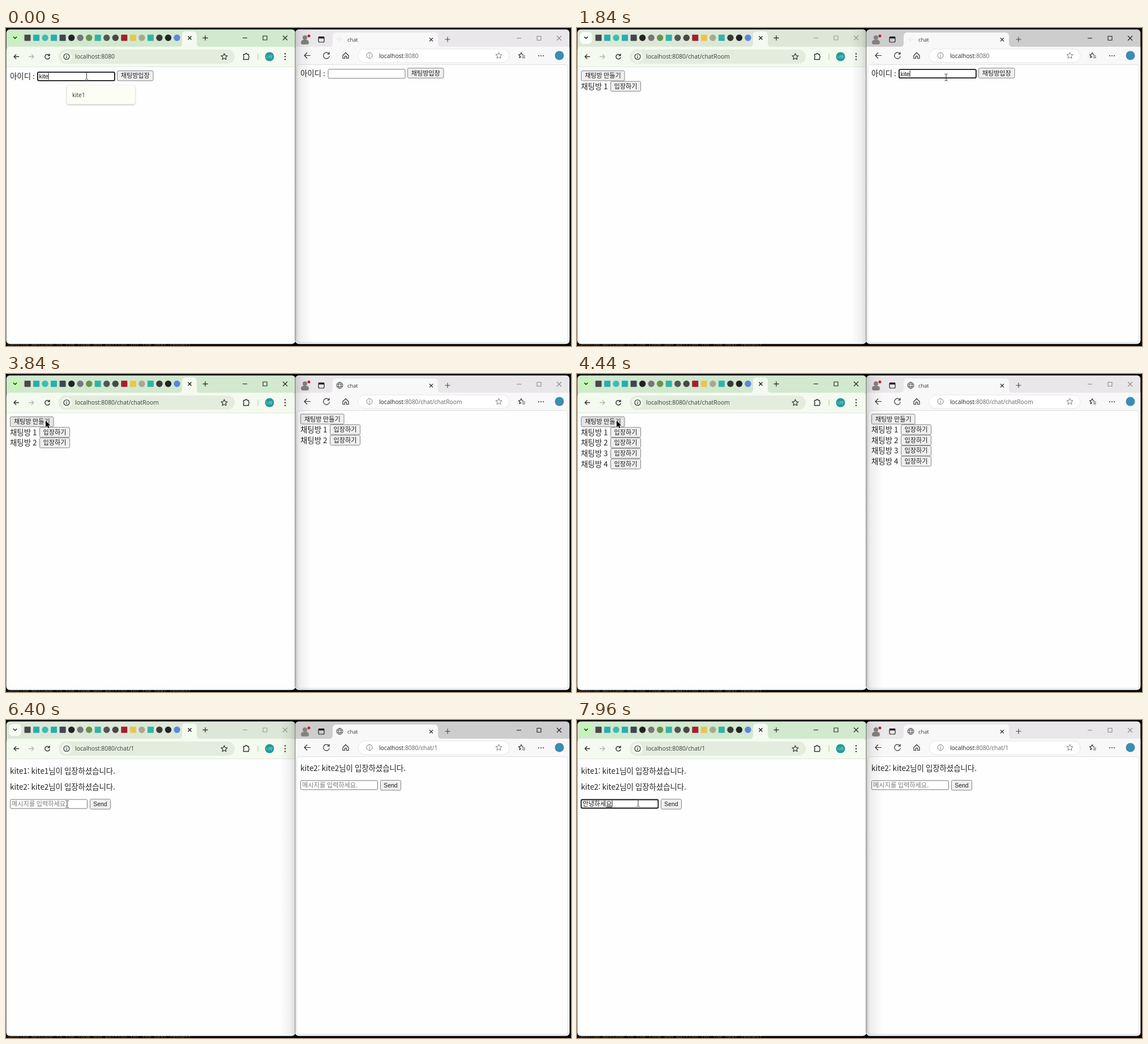
Animation of 998x561 px, one loop 8000 ms. Source, as an HTML page with a canvas:

```html
<!DOCTYPE html>
<html lang="ko">
<head>
<meta charset="utf-8">
<title>chat</title>
<style>
html, body { margin: 0; width: 100%; height: 100%; overflow: hidden; background: #000; }
canvas { display: block; width: 100vw; height: 100vh; }
</style>
</head>
<body>
<canvas id="stage" width="998" height="561"></canvas>
<script>
const c = document.getElementById('stage').getContext('2d');
const LOOP = 8000;
const KR = '"Noto Sans CJK KR", "Noto Sans CJK JP", "Noto Sans CJK", sans-serif';
const UI = '"Open Sans", sans-serif';
const ARIAL = '"Liberation Sans", "Noto Sans CJK KR", sans-serif';
const TYPED = 'ㅇ,아,안,안ㄴ,안녀,안녕,안녕ㅎ,안녕하,안녕핫,안녕하세,안녕하셍,안녕하세요'.split(',');
const JOINED = n => `kite${n}: kite${n}님이 입장하셨습니다.`;

// Pointer path: time, x, y
const PATH = [
  [0, 142.5, 84.5], [280, 142.5, 84.5], [600, 228, 84], [850, 228, 84], [1200, 652, 87], [2000, 652, 87],
  [2250, 741, 81], [2430, 741, 81], [2580, 757, 187], [2700, 757, 187], [3180, 70, 82], [4440, 70, 82],
  [4800, 90, 98], [5200, 90, 98], [5500, 617, 99], [5950, 617, 99], [6350, 108, 148.5], [6650, 108, 146.5], [LOOP, 108, 146.5]
];
const FAVICONS = [
  ['#484848', 1], ['#28aeb0', 1], ['#3abdb5', 0], ['#28aeb0', 1], ['#3c4654', 1], ['#222', 0],
  ['#777', 0], ['#6a934f', 0], ['#2fb5a5', 1], ['#555', 0], ['#484848', 0], ['#a3202c', 1],
  ['#e6c650', 1], ['#a8a890', 0], ['#2fb5a5', 1], ['#3a3a3a', 0], ['#222', 0], ['#5b86dc', 0]
];

let pointer, overInput;
let origin = { x: 0, y: 0 };

function pointerAt(t) {
  const i = Math.max(1, PATH.findIndex(p => p[0] >= t));
  const [t0, x0, y0] = PATH[i - 1], [t1, x1, y1] = PATH[i];
  const u = (t - t0) / (t1 - t0), e = u * u * (3 - 2 * u);
  return { x: x0 + (x1 - x0) * e, y: y0 + (y1 - y0) * e };
}

function text(s, x, y, size, color = '#222', font = KR) {
  c.font = size + 'px ' + font;
  c.fillStyle = color;
  c.fillText(s, x, y);
  return c.measureText(s).width;
}

function box(x, y, w, h, r, fill, stroke, width = 1) {
  c.beginPath();
  c.roundRect(x, y, w, h, r);
  if (fill) { c.fillStyle = fill; c.fill(); }
  if (stroke) { c.strokeStyle = stroke; c.lineWidth = width; c.stroke(); }
}

function disc(x, y, r, fill) {
  c.beginPath();
  c.arc(x, y, r, 0, 7);
  c.fillStyle = fill;
  c.fill();
}

// Strokes SVG path data centred on (x, y)
function icon(d, x, y, color = '#333', width = 1.2) {
  c.save();
  c.translate(x, y);
  c.strokeStyle = color;
  c.lineWidth = width;
  c.lineJoin = 'round';
  c.stroke(new Path2D(d));
  c.restore();
}

const ICON = {
  back: 'M5 0H-4M0 -4L-4 0L0 4',
  forward: 'M-5 0H4M0 -4L4 0L0 4',
  reload: 'M3.4 -2.4A4.2 4.2 0 1 0 4.2 1M4 -5V-1.8H.8',
  info: 'M-5 0A5 5 0 1 0 5 0A5 5 0 1 0 -5 0M0 -.8V3M0 -3V-1.8',
  star: 'M0 -5.5L1.6 -1.9L5.5 -1.5L2.6 1.1L3.4 5L0 3L-3.4 5L-2.6 1.1L-5.5 -1.5L-1.6 -1.9Z',
  puzzle: 'M-5 -3.5H-2A1.7 1.7 0 0 1 1.4 -3.5H4V-.5A1.7 1.7 0 0 1 4 2.5V5.5H-5V2.5A1.7 1.7 0 0 0 -5 -.5Z',
  home: 'M-5 0L0 -5L5 0V5H1.5V1H-1.5V5H-5Z',
  list: 'M-1 2L-4 4L-3.2 .8L-5.6 -1.4L-2.6 -1.8L-1 -5L.6 -1.8L3 -1.5M1 1H6M1 4H6',
  globe: 'M-5.5 0A5.5 5.5 0 1 0 5.5 0A5.5 5.5 0 1 0 -5.5 0M-5 -2H5M-5 2H5M0 -5.5C-3.4 -2 -3.4 2 0 5.5C3.4 2 3.4 -2 0 -5.5',
  plus: 'M-4.5 0H4.5M0 -4.5V4.5',
  close: 'M-4 -4L4 4M4 -4L-4 4',
  cross: 'M-3 -3L3 3M3 -3L-3 3',
  min: 'M-4 0H4',
  max: 'M-3.5 -3.5H3.5V3.5H-3.5Z',
  chevron: 'M-3 -1.5L0 1.5L3 -1.5'
};

function windowButtons(x, y, color) {
  ['min', 'max', 'close'].forEach((name, i) => icon(ICON[name], x + i * 35.5, y, color, 1.1));
}

// Active tab with corners flaring into the toolbar below
function tab(x0, x1, top, bottom, fill) {
  const r = 6;
  c.beginPath();
  c.moveTo(x0 - r, bottom);
  c.arcTo(x0, bottom, x0, bottom - r, r);
  c.arcTo(x0, top, x0 + r, top, r);
  c.arcTo(x1, top, x1, top + r, r);
  c.arcTo(x1, bottom, x1 + r, bottom, r);
  c.lineTo(x1 + r, bottom);
  c.fillStyle = fill;
  c.fill();
}

function pointerInside(x, y, w, h) {
  const px = pointer.x - origin.x, py = pointer.y - origin.y;
  return px > x && px < x + w && py > y && py < y + h;
}

function button(label, x, y, w, font = KR, size = 11.1) {
  const fill = pointerInside(x, y, w, 18) ? '#e5e5e5' : '#efefef';
  box(x + .5, y + .5, w - 1, 17.5, 2, fill, '#858585');
  c.textAlign = 'center';
  text(label, x + w / 2, y + 13.2, size, '#1c1c1c', font);
  c.textAlign = 'left';
}

function input(x, y, { value = '', focus, hint, composing }) {
  if (pointerInside(x, y - 2, 137, 21)) overInput = true;
  if (focus) box(x + .4, y + .8, 136, 15, 2, '#fff', '#151515', 1.8);
  else box(x + .5, y + .5, 136, 16, 2, '#fff', '#777');
  if (!value && hint) text(hint, x + 3, y + 12.4, 11.2, '#7a7a7a');
  const font = composing ? KR : ARIAL, size = composing ? 11.2 : 10.3;
  const w = value ? text(value, x + 3, y + 12.2, size, '#151515', font) : 0;
  c.fillStyle = '#151515';
  if (focus) c.fillRect(x + 3 + w, y + 2.5, 1, 11.5);
  if (composing && value) c.fillRect(x + 3 + w - 10, y + 13.3, 10, 1);
}

// Pages share one layout; the origin places them in a window
function loginPage(state) {
  text('아이디 :', 7, 89.5, 13.4);
  input(55.5, 77, state);
  button('채팅방입장', 196, 75, 64.5);
}

function roomsPage(count) {
  button('채팅방 만들기', 7, 75, 77.5);
  for (let i = 1; i <= count; i++) {
    const y = 75 + i * 18.6;
    text('채팅방 ' + i, 7, y + 14.2, 13.4);
    button('입장하기', 59, y, 54);
  }
}

function chatPage(messages, state) {
  messages.forEach((m, i) => text(m, 7, 94.6 + i * 28.6, 13.4));
  const y = 82.5 + messages.length * 28.6;
  input(7, y, { hint: '메시지를 입력하세요.', ...state });
  button('Send', 148, y - .5, 37, ARIAL, 10.4);
}

const roomCount = t => t < 3640 ? 1 : t < 4040 ? 2 : t < 4240 ? 3 : 4;

function leftWindow(t, active, url) {
  box(.7, 2.5, 510.3, 554.8, 6, active ? '#d2e8cf' : '#dde7d7');
  box(5, 7, 22, 21, 7, active ? '#c5f4b9' : '#f8fcf5');
  icon(ICON.chevron, 16, 17, '#222', 1.6);
  FAVICONS.forEach(([color, square], i) => {
    const x = 38 + i * 15.53;
    square ? box(x - 5.5, 11.7, 11, 11, 1, color) : disc(x, 17.2, 5.7, color);
  });
  const bar = '#f4faef';
  tab(311, 337, 6, 33.5, bar);
  icon(ICON.cross, 324.5, 17.5, '#222', 1.5);
  icon(ICON.plus, 352, 17.5, '#333', 1.3);
  windowButtons(422, 17.5, active ? '#222' : '#999');
  box(.7, 33, 510.3, 36, [6, 6, 0, 0], bar);
  icon(ICON.back, 18, 50.5, '#333', 1.4);
  icon(ICON.forward, 45, 50.5, '#b2b8ae', 1.3);
  icon(ICON.reload, 73, 50.5, '#333', 1.4);
  box(93, 38, 311, 25, 12.5, '#e3ecdd');
  disc(107, 50.5, 10, '#f0f6eb');
  icon(ICON.info, 107, 50.5);
  text(url, 122, 54.3, 10.4, '#3b4138', UI);
  icon(ICON.star, 385.5, 50.5);
  icon(ICON.puzzle, 424.5, 50, '#333', 1.4);
  c.fillStyle = '#c9e6c2';
  c.fillRect(444, 45, 2, 11);
  disc(465.5, 50.5, 8, '#239a9b');
  c.textAlign = 'center';
  text('나무', 465.5, 53, 6, '#c8eeee');
  c.textAlign = 'left';
  for (const y of [45.5, 50.5, 55.5]) disc(493, y, 1.2, '#333');
  box(.7, 69, 510.3, 488.3, [0, 0, 6, 6], '#fefefe');
  c.fillStyle = '#dfe6db';
  c.fillRect(1, 68, 510, 1);

  origin = { x: 0, y: 0 };
  if (t < 750) {
    loginPage({ value: t < 140 ? 'kite' : 'kite1', focus: t < 680 });
    if (t < 350) {
      c.save();
      c.shadowColor = 'rgba(0,0,0,.3)';
      c.shadowBlur = 3;
      c.shadowOffsetY = 1;
      box(107.5, 101, 120.5, 33.5, 4, '#fcfdf5');
      c.restore();
      text('kite1', 117, 121.5, 10, '#333', UI);
    }
  } else if (t < 5160) {
    roomsPage(roomCount(t));
  } else {
    const typed = Math.min(TYPED.length, Math.floor((t - 7040) / 82) + 1);
    const value = typed > 0 ? TYPED[typed - 1] : '';
    chatPage(t < 5860 ? [JOINED(1)] : [JOINED(1), JOINED(2)],
      { value, focus: t >= 6550, composing: true });
  }
}

function rightWindow(t, active, url) {
  box(511, 2.5, 484.3, 554.8, 6, active ? '#cdcdcd' : '#eae7ea');
  disc(528, 17, 4, '#858080');
  box(521, 21, 14, 8, [5, 5, 4, 4], '#858080');
  disc(535, 14, 2.5, '#b3262c');
  box(552, 15.5, 10, 9.5, 2, null, '#222', 1.2);
  c.fillStyle = '#222';
  c.fillRect(552, 15, 10, 3.5);
  const bar = '#f8f8f8';
  tab(577, 763, 8, 33.5, bar);
  if (t < 2400) icon('M-5 0H-1M1 0H5M0 -4V-1M0 1V4', 589, 20, '#ddd');
  else icon(ICON.globe, 589.5, 20, '#444', 1);
  text('chat', 603, 23.7, 9.3, '#333', UI);
  icon(ICON.cross, 751, 20.5, '#333', 1.2);
  icon(ICON.plus, 780, 20, '#444', 1.1);
  windowButtons(906, 18, active ? '#222' : '#8b8b8b');
  box(511, 33, 484.3, 524.3, [0, 0, 6, 6], bar);
  icon('M6 0H-5M0 -5L-5 0L0 5', 532, 48.5);
  icon('M4.5 -3A5.4 5.4 0 1 0 5.4 1M5 -6V-2.4H1.4', 566, 48.5);
  icon(ICON.home, 600, 48.5);
  box(622, 37, 267, 24, 12, '#fff', '#e6e6e6');
  icon(ICON.info, 642, 48.5, '#777', 1);
  const hostWidth = text('localhost', 659, 52.5, 10.3, '#222', UI);
  text(url.slice(9), 659 + hostWidth, 52.5, 10.3, '#626262', UI);
  icon(ICON.star, 870.5, 48.5, '#777', 1);
  icon(ICON.list, 911, 48.5);
  for (const x of [941, 945, 949]) disc(x, 49, 1, '#333');
  disc(977.5, 48.5, 8, '#3c8cb4');
  box(513.5, 64.5, 479, 490, 5, '#fefefe', '#dedede');

  origin = { x: 513, y: -4.7 };
  c.save();
  c.translate(origin.x, origin.y);
  if (t < 2400) {
    const n = Math.max(0, Math.floor((t - 1480) / 95) + 1);
    loginPage({ value: 'kite2'.slice(0, n), focus: t >= 1320 && t < 2330 });
  } else if (t < 5840) {
    roomsPage(roomCount(t));
  } else {
    chatPage([JOINED(2)], {});
  }
  c.restore();
}

// Shadow of the front window falling on the one behind
function edgeShadow(x0, x1) {
  const g = c.createLinearGradient(x0, 0, x1, 0);
  g.addColorStop(0, 'rgba(0,0,0,.14)');
  g.addColorStop(.35, 'rgba(0,0,0,.055)');
  g.addColorStop(1, 'rgba(0,0,0,0)');
  c.fillStyle = g;
  c.fillRect(Math.min(x0, x1), 4, Math.abs(x1 - x0), 552);
}

function drawPointer() {
  const { x, y } = pointer;
  if (overInput) {
    icon('M-2.5 -6H-1L0 -5L1 -6H2.5M0 -5V5M-2.5 6H-1L0 5L1 6H2.5', x, y, '#333', 1);
    return;
  }
  c.save();
  c.translate(x, y);
  const arrow = new Path2D('M0 0V12L2.7 9.5L4.6 13.5L6.5 12.6L4.7 8.8H8.2Z');
  c.strokeStyle = '#fff';
  c.lineWidth = 1.2;
  c.stroke(arrow);
  c.fillStyle = '#000';
  c.fill(arrow);
  c.restore();
}

function draw(t) {
  const leftActive = t < 1320 || (t >= 3240 && t < 5700) || t >= 6550;
  const host = 'localhost:8080', rooms = '/chat/chatRoom', room = '/chat/1';
  pointer = pointerAt(t);
  overInput = false;
  c.fillStyle = '#050505';
  c.fillRect(0, 0, 998, 561);
  text('sending message to the room and waiting for the next request', 2, 562, 9, '#555', '"DejaVu Sans Mono", monospace');

  leftWindow(t, leftActive, host + (t < 750 ? '' : t < 5160 ? rooms : room));
  rightWindow(t, !leftActive, host + (t < 2400 ? '' : t < 5840 ? rooms : room));
  leftActive ? edgeShadow(511, 540) : edgeShadow(511, 484);
  c.fillStyle = leftActive ? '#626b62' : '#777';
  c.fillRect(510.3, 8, 1, 544);
  drawPointer();
}

const start = performance.now();
function frame(now) {
  draw(Math.max(0, now - start) % LOOP);
  requestAnimationFrame(frame);
}
requestAnimationFrame(frame);
</script>
</body>
</html>
```
